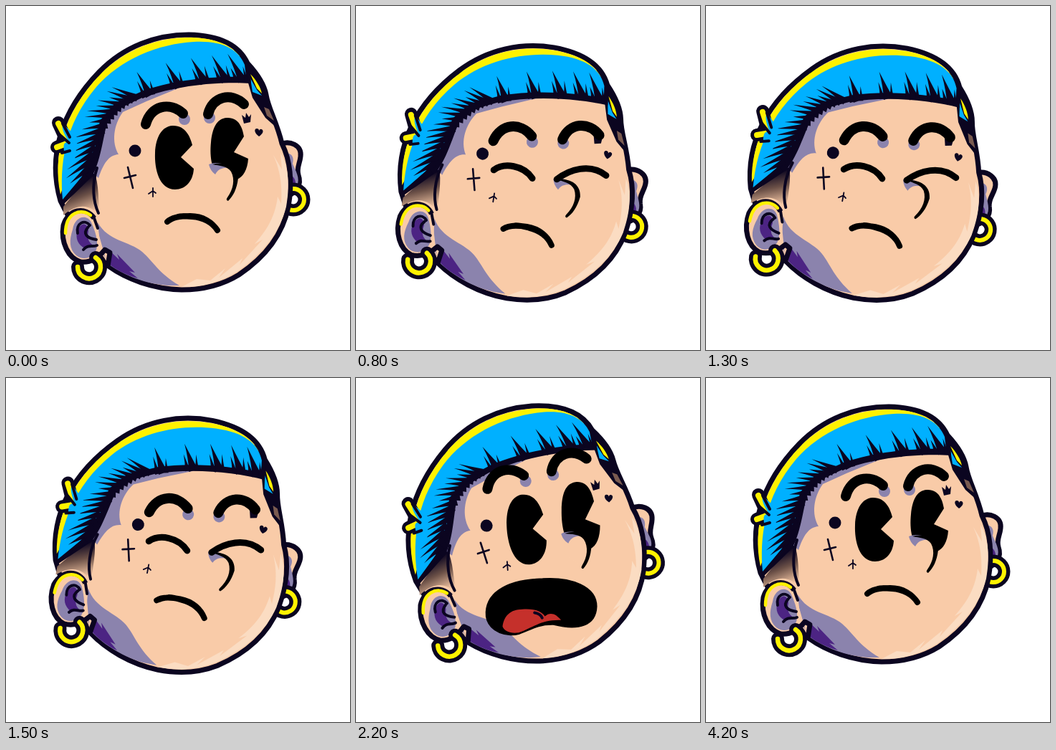
An HTML page for the animation above (4400 ms loop, 480 by 480 pixels).

```html
<!DOCTYPE html>
<html lang="en">
<head>
<meta charset="utf-8">
<title>Head shake and gasp</title>
<style>
  html, body { margin: 0; width: 100%; height: 100%; overflow: hidden; background: #fff; }
  svg { display: block; width: 100%; height: 100%; }
  .ink { fill: #0b0520; }
  .black { fill: #000; }
  .line { fill: none; stroke: #0b0520; stroke-linecap: round; stroke-linejoin: round; }
  .edge { stroke: #0b0520; stroke-width: 7; stroke-linejoin: round; }
  .bold { fill: none; stroke: #000; stroke-linecap: round; }
  .gold { fill: none; stroke: #fff200; stroke-linecap: round; }
  .skin { fill: #f9cba8; }
  .pale { fill: #fbdcc2; }
  .shade { fill: #8b83ad; }
  .deep { fill: #4c2483; }
  .blue { fill: #00b0ff; }
  .yellow { fill: #fff200; }
</style>
</head>
<body>
<svg viewBox="0 0 480 480">
  <defs>
    <linearGradient id="fade" gradientUnits="userSpaceOnUse" x1="98" y1="246" x2="116" y2="290">
      <stop offset="0" stop-color="#0b0520"/>
      <stop offset=".45" stop-color="#6b5047"/>
      <stop offset="1" stop-color="#f9cba8"/>
    </linearGradient>
    <clipPath id="lips"><path id="lipShape"/></clipPath>
  </defs>

  <g id="head">
    <!-- right ear and ring -->
    <path class="skin edge" d="M382 193C396 187 413 194 411 210C410 220 405 226 408 236C413 250 405 260 392 266Z"/>
    <path class="shade" d="M391 205C400 206 402 212 400 220C404 230 411 240 406 251L394 262Z"/>
    <path class="deep" d="M397 236C402 238 407 246 402 254L394 260Z"/>
    <circle class="line" cx="401" cy="270" r="15" stroke-width="17"/>
    <circle class="gold" cx="401" cy="270" r="15" stroke-width="6"/>

    <!-- skull -->
    <path class="skin edge" d="M76 272C58 210 76 148 130 92C165 56 210 40 255 40C300 41 326 56 337 80C350 94 360 108 363 124C366 143 378 162 385 192C398 218 399 250 394 280C386 320 362 350 325 375C296 393 266 396 245 396C205 395 168 381 143 363C125 346 104 330 76 272Z"/>
    <path class="pale" d="M383 205C395 225 396 252 391 280C382 316 358 346 322 371C294 388 266 393 245 392L266 381L285 383L306 366L297 379L330 352L326 361L358 326L347 332C368 308 376 290 379 266L384 276C386 245 381 226 373 208L385 228Z"/>
    <path class="shade" d="M128 302C142 328 172 328 190 343C206 357 212 372 242 390L226 390C196 388 165 376 144 361L132 340Z"/>
    <path class="deep" d="M143 340L158 354L155 346L180 372L172 370L184 380C166 375 152 367 144 360Z"/>

    <!-- back hair -->
    <path class="ink" d="M332 76C350 94 361 108 364 126C366 145 374 156 380 172L362 156L344 128L337 104Z"/>
    <path class="yellow" d="M341 95C349 103 355 113 357 122L350 115Z"/>
    <path class="blue" d="M341 101L350 117L357 125L344 120Z"/>
    <path d="M360 141L367 144L374 160L364 153Z" fill="#7a5b50"/>
    <path d="M80 280L122 228C131 250 128 274 131 294C118 276 100 275 80 292Z" fill="url(#fade)"/>
    <path class="shade" d="M146 144L240 106L252 110L196 133L163 148C150 166 147 190 157 207C143 208 136 220 129 240L120 232Z"/>

    <!-- hair -->
    <path class="ink" d="M74 264L80 277L120 238C134 212 135 180 145 149L190 128C240 110 300 105 342 108L340 84L320 62L130 94Z"/>
    <path class="yellow" d="M76 263C65 210 79 150 132 95C166 61 210 44 255 44C290 44 314 54 326 70L200 80L110 170Z"/>
    <path class="blue" d="M79 270C75 225 80 167 126 113C160 74 212 53 262 50C302 48 324 60 333 82L335 99C292 98 240 102 192 118L152 136L131 160L125 195L106 238Z"/>
    <g id="spikes" class="ink"></g>
    <path class="line" d="M84 187L73 163M88 190L71 197" stroke-width="18"/>
    <path class="gold" d="M86 188L73 164M90 190L71 197" stroke-width="8"/>
    <path class="blue" d="M83 215C80 195 78 190 88 190C82 180 77 172 79 164L100 184L96 215Z"/>
    <path class="line" d="M73 178L88 191M78 205L89 202M79 164L89 183" stroke-width="4"/>
    <path class="line" d="M127 226C119 250 122 274 129 289" stroke-width="4"/>

    <!-- left ear and ring -->
    <g transform="translate(-1 2)">
      <path class="skin edge" d="M124 294C112 277 88 281 81 304C77 328 88 350 105 355C119 357 130 349 139 338L146 342L143 361"/>
      <path class="shade" d="M94 310C97 291 114 288 120 300C126 313 129 324 128 334C126 348 110 355 99 346C89 337 89 325 94 310Z"/>
      <path class="deep" d="M101 310C108 298 115 302 116 312C114 322 116 328 123 332L112 337C101 331 97 322 101 310Z"/>
      <path class="gold" d="M119 290C107 280 84 285 84 315" stroke-width="4.5"/>
      <path class="line" d="M101 315C98 301 111 295 118 304M116 306C107 316 114 322 127 324M109 338C116 330 121 335 128 332M124 294L129 308" stroke-width="4"/>
      <path class="line" d="M101 362A16 16 0 1 0 126 349" stroke-width="18"/>
      <path class="gold" d="M101 362A16 16 0 1 0 126 349" stroke-width="6.5"/>
    </g>

    <!-- small marks -->
    <circle class="ink" cx="180" cy="202" r="8.5"/>
    <path class="line" d="M170 225L177 254M165 240L181 236" stroke-width="2.6"/>
    <path class="line" d="M205 254V266M199 262L205 258L209 261" stroke-width="1.8"/>
    <path class="ink" d="M329 152L334 156L335 149L339 155L342 151L341 162L332 164Z"/>
    <path class="ink" d="M353 182C346 177 346 171 350 171Q353 171 353 174Q355 170 358 173C360 176 356 180 353 182Z"/>

    <g id="open" class="black">
      <path d="M232 167C250 166 257 182 260 194L244 211L262 227C261 245 250 256 236 256C214 256 207 228 208 205C209 182 218 168 232 167Z"/>
      <path d="M308 156C325 155 330 170 332 182L318 204L338 213C337 228 331 239 322 242L288 222C285 212 285 200 286 190C288 170 294 157 308 156Z"/>
    </g>

    <!-- nose -->
    <path class="skin" d="M286 224C300 218 322 223 322 240C321 254 316 262 309 268L286 250Z"/>
    <path class="shade" d="M283 221C291 217 306 219 313 226C303 225 296 227 292 235Q285 230 283 221Z"/>
    <path class="black" d="M288 221C304 217 322 221 324 240C322 256 317 265 310 272Q306 271 309 267C317 256 320 242 314 231C308 223 298 223 288 221Z"/>

    <g id="shut">
      <path class="bold" d="M199 222C212 209 239 209 254 225" stroke-width="9"/>
      <path class="bold" d="M288 221C303 205 330 191 355 205" stroke-width="9"/>
    </g>
    <g id="browL">
      <circle class="shade" cx="249" cy="158" r="8"/>
      <path class="bold" d="M195 165C202 139 228 133 247 150" stroke-width="14"/>
    </g>
    <g id="browR">
      <circle class="shade" cx="284" cy="156" r="8"/>
      <path class="bold" d="M282 151C288 126 314 120 332 137" stroke-width="14"/>
    </g>

    <path id="mouth" fill="#000" stroke="#000" stroke-linejoin="round"/>
    <g clip-path="url(#lips)">
      <g id="tongue">
        <path d="M192 344C195 329 205 321 221 322C239 322 248 327 252 334C260 328 268 332 274 341C246 338 234 349 214 354C203 355 194 351 192 344Z" fill="#c5302b"/>
        <path class="line" d="M238 328Q246 330 248 336" stroke-width="4"/>
      </g>
    </g>
  </g>
</svg>
<script>
const $ = id => document.getElementById(id);
const STEP = 100, LOOP = 4400;

const FROWN = "M225 301C230 296 240 293 257 293C275 293 288 302 295 313C288 302 275 295 260 294C250 293 243 293 240 294C233 296 229 298 225 301Z";
const GASP = "M170.5 322C174.5 292 207.6 279.4 252.6 281.5C292.8 282 327 297.6 325 325.6C322 352.5 297.7 358 263 346.5C233 343.5 222 359 202 356.5C177.5 352.7 168.5 337 170.5 322Z";

const mix = (a, b, k) => a + (b - a) * k;
const wave = deg => Math.cos(deg * Math.PI / 180);
const shift = (id, x, y) => $(id).setAttribute("transform", `translate(${x} ${y})`);
const show = (id, on) => $(id).style.display = on ? "" : "none";

function smooth(from, to, t) {
  const k = Math.min(1, Math.max(0, (t - from) / (to - from)));
  return k * k * (3 - 2 * k);
}

function morph(from, to, k) {
  const goal = to.match(/[\d.]+/g);
  let i = 0;
  return from.replace(/[\d.]+/g, n => mix(+n, +goal[i++], k).toFixed(2));
}

let seed = 7;
const random = () => (seed = seed * 16807 % 2147483647) / 2147483647;

// Point on a quadratic curve
const along = ([a, b, c], t) => [0, 1].map(i => mix(mix(a[i], b[i], t), mix(b[i], c[i], t), t));

function spike([x, y], angle, len, width) {
  const c = Math.cos(angle), s = Math.sin(angle), w = width / 2;
  const at = (u, v) => `${x + u * c - v * s} ${y + u * s + v * c} `;
  return `<path d="M${at(-4, w)}Q${at(len * .4, w * .5)}${at(len, 0)}Q${at(len * .4, -w * .2)}${at(-4, -w)}Z"/>`;
}

function hairSpikes() {
  const fringe = [[150, 143], [235, 98], [338, 101]];
  const side = [[180, 127], [130, 150], [110, 240]];
  let out = "";
  for (let i = 0; i < 5; i++) {
    const t = .28 + .24 * i - .018 * i * i;
    out += spike(along(fringe, t), -2.08, 34 + 6 * random(), 13);
    out += spike(along(fringe, t - .04), -2, 14 + 8 * random(), 7);
    out += spike(along(fringe, t + .03), -1.8, 14 + 8 * random(), 6);
  }
  for (let i = 0; i < 17; i++) {
    const t = i / 16;
    out += spike(along(side, t), Math.PI + mix(.4, -.75, t), 24 + 16 * random(), 10);
  }
  return out;
}

function draw(ms) {
  const tick = Math.floor(ms % LOOP / STEP);
  const rise = smooth(18.7, 21.7, tick);
  const shake = smooth(2, 7, tick) * (1 - rise);
  const gasp = rise * (1 - smooth(37.6, 42, tick));

  const phase = (tick - 13) * 60;
  const x = shake * -8 * wave(phase - 30) + gasp * 3.3;
  const y = shake * 12.5;
  const turn = shake * (12.2 + 3.2 * wave(phase + 122)) - gasp * 4.2;
  $("head").setAttribute("transform", `translate(${x} ${y}) rotate(${turn} 235 220)`);

  shift("browL", -3 * shake - 10 * gasp, 17 * shake - 14 * gasp);
  shift("browR", 5 * shake - 6 * gasp, 14 * shake - 18 * gasp);

  const closed = shake > .5;
  show("open", !closed);
  show("shut", closed);
  const tall = 1 - shake * 1.4 + gasp * .1;
  $("open").setAttribute("transform", `translate(0 212) scale(1 ${tall}) translate(0 -212)`);

  const lips = morph(FROWN, GASP, gasp);
  $("mouth").setAttribute("d", lips);
  $("lipShape").setAttribute("d", lips);
  $("mouth").setAttribute("stroke-width", mix(8, 1.5, gasp));
  show("tongue", gasp > .2);
  shift("tongue", 0, 24 * (1 - gasp));
}

$("spikes").innerHTML = hairSpikes();
const start = performance.now();
function frame() {
  draw(performance.now() - start);
  requestAnimationFrame(frame);
}
frame();
</script>
</body>
</html>
```
